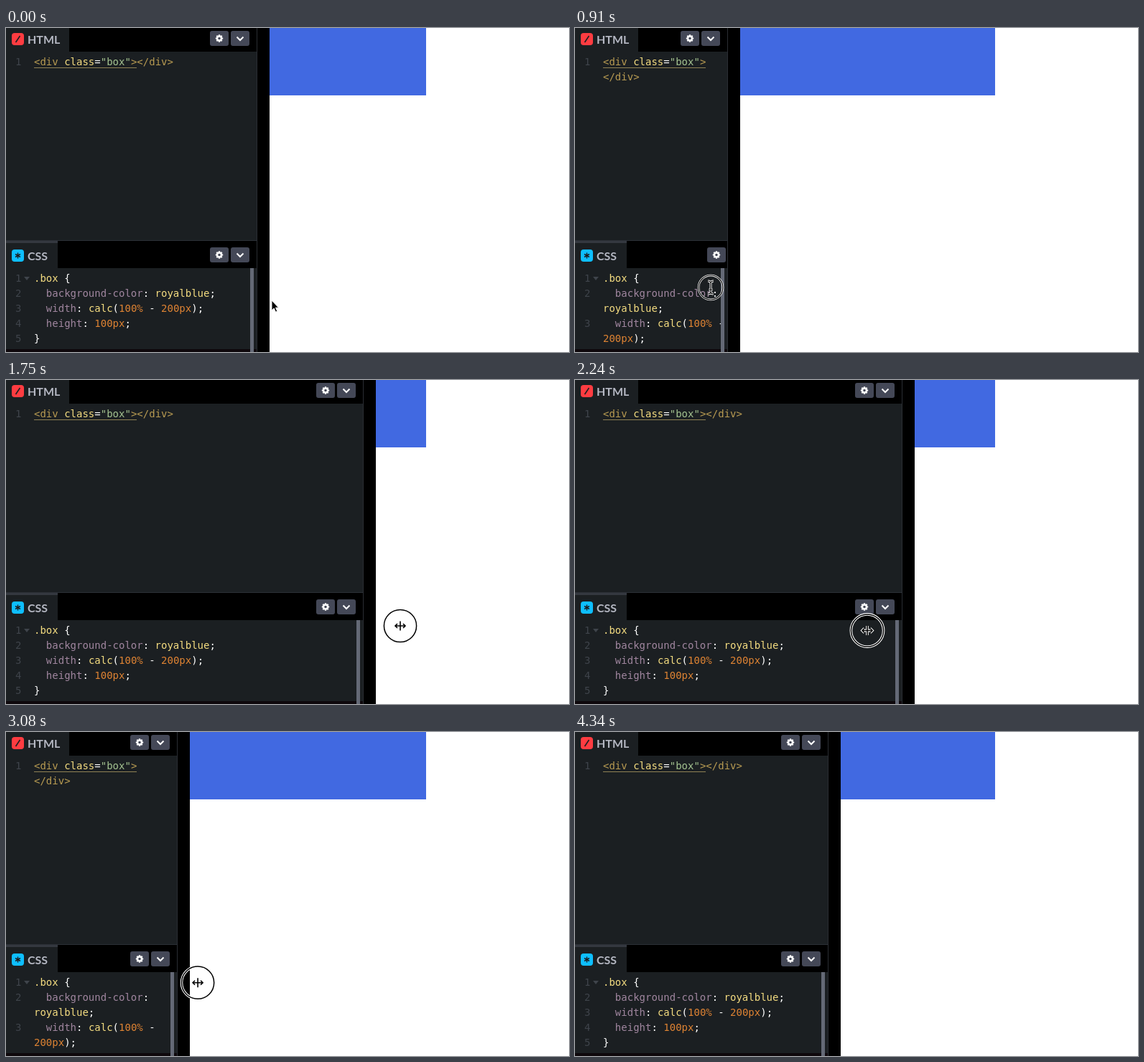
These frames come from a looping animation (784x452 px, 4830 ms). An HTML page:

```html
<!DOCTYPE html>
<html lang="en">
<head>
<meta charset="utf-8">
<title>Resizing a calc() box</title>
<style>
  html, body { margin: 0; width: 100%; height: 100%; overflow: hidden; background: #fff; }
  #stage { position: relative; width: 784px; height: 452px; overflow: hidden; background: #fff; --w: 350px; }
  #stage div, #stage svg { position: absolute; box-sizing: border-box; }
  #box { left: calc(var(--w) + 17px); right: 199px; top: 0; height: 94px; background: #4169e1; }
  #gutter { left: 0; top: 0; height: 452px; width: calc(var(--w) + 17px); background: #000; }
  .panel { left: 0; width: var(--w); overflow: hidden; border-right: 1px solid #2a2d33; }
  #html { top: 0; height: 297px; border-bottom: 1px solid #2c3037; --head: 33px; --mid: 15px; }
  #css { top: 297px; height: 155px; --head: 38px; --mid: 20px; }
  .tab { left: 0; top: 0; height: var(--head); background: #1b1f22; }
  #html .tab { width: 88px; }
  #css .tab { width: 72px; border-top: 3px solid #343840; }
  .icon { left: 8px; top: calc(var(--mid) - 8px); }
  .label { left: 30px; top: calc(var(--mid) - 9px); font: bold 16px/20px Lato, sans-serif; color: #b4b7c2; }
  .btn { top: calc(var(--mid) - 11px); width: 26px; height: 21px; border-radius: 3px; background: #444857; }
  .btn svg { left: 0; top: 0; }
  .gear { left: max(94px, calc(var(--lay) - 66px)); }
  .more { left: max(123px, calc(var(--lay) - 37px)); }
  .panel { --lay: calc(var(--w) + var(--slack, 0px)); }
  .code { left: 0; right: 0; top: var(--head); bottom: 0; background: #1b1f22; overflow: hidden; }
  #css .code { bottom: 4px; }
  .lines { top: 4px; left: 39px; width: max(20px, calc(var(--lay) - 68px));
    font: 14px/21px "DejaVu Sans Mono", monospace; color: #fff; white-space: pre-wrap; }
  #stage .line { position: relative; }
  .line::before { content: attr(data-n); position: absolute; left: -26px; top: 0; color: #3f444b; }
  .fold { left: -14px; top: 8px; border: solid transparent; border-width: 5px 4px 0; border-top-color: #3f444b; }
  .bar { right: 4px; width: 5px; top: 38px; bottom: 0; background: #646976; }
  .foot { left: 0; right: 0; bottom: 0; height: 4px; background: #0e080c; }
  .open { box-shadow: 0 1px #8f8154; }
  .t { color: #b89b52; } .a { color: #f4dc80; } .s { color: #a3c290; }
  .p { color: #a0869f; } .n { color: #de8333; }
  #mouse { left: 0; top: 0; overflow: visible; }
</style>
</head>
<body>
<div id="stage">
  <div id="box"></div>
  <div id="gutter"></div>

  <div id="html" class="panel">
    <div class="code"><div class="lines"><div class="line" data-n="1"><span class="open"><span class="t">&lt;div</span> <span class="a">class</span>=<span class="s">"box"</span><span class="t">&gt;</span></span><wbr><span class="t">&lt;/div&gt;</span></div></div></div>
    <div class="tab"></div>
    <svg class="icon" width="17" height="17"><rect width="17" height="17" rx="4" fill="#ff3c41"/><path d="M5.5 13L11.5 4" stroke="#1b1f22" stroke-width="1.6"/></svg>
    <div class="label">HTML</div>
  </div>

  <div id="css" class="panel">
    <div class="code"><div class="lines"><div class="line" data-n="1"><div class="fold"></div><span class="a">.box</span> {</div><div class="line" data-n="2">  <span class="p">background-color</span>: <span class="a">royalblue</span>;</div><div class="line" data-n="3">  <span class="p">width</span>: <span class="a">calc</span>(<span class="n">100%</span> - <span class="n">200px</span>);</div><div class="line" data-n="4">  <span class="p">height</span>: <span class="n">100px</span>;</div><div class="line" data-n="5">}</div></div></div>
    <div class="foot"></div>
    <div class="bar"></div>
    <div class="tab"></div>
    <svg class="icon" width="17" height="17"><rect width="17" height="17" rx="4" fill="#0ebeff"/><path d="M8.5 4.5v8M5 6.5l7 4M12 6.5l-7 4" stroke="#1b1f22" stroke-width="1.5"/></svg>
    <div class="label">CSS</div>
  </div>

  <svg id="mouse" width="784" height="452" fill="none">
    <g id="pointer">
      <g id="ring"><circle r="22.6" stroke="#fff" stroke-width="3.6"/><circle r="22.6" stroke="#000" stroke-width="1.5"/></g>
      <path id="arrow" d="M0 0V14L3.2 11L5.5 16.2L7.8 15.2L5.5 10.2H9.6Z" fill="#000" stroke="#fff" stroke-width="1"/>
      <g id="resize">
        <path d="M-6 0H6M0-6.5V6.5M-4-3L-7 0L-4 3M4-3L7 0L4 3" stroke="#fff" stroke-width="3.6"/>
        <path d="M-6 0H6M0-6.5V6.5M-4-3L-7 0L-4 3M4-3L7 0L4 3" stroke="#000" stroke-width="1.6"/>
      </g>
      <g id="beam">
        <path d="M-4-9Q0-9 0-6V6Q0 9-4 9M4-9Q0-9 0-6V6Q0 9 4 9M-2.5 3H2.5" stroke="#fff" stroke-width="3"/>
        <path d="M-4-9Q0-9 0-6V6Q0 9-4 9M4-9Q0-9 0-6V6Q0 9 4 9M-2.5 3H2.5" stroke="#000" stroke-width="1.2"/>
      </g>
    </g>
  </svg>
</div>
<script>
  const LOOP = 4830, STEP = 70, LAG = 60;
  const $ = id => document.getElementById(id);
  const stage = $('stage');

  // Pointer path: time, x, y
  const path = [
    [0, 370, 380], [209, 370, 380], [280, 368, 380], [630, 368, 380],
    [770, 300, 371], [850, 231, 365], [910, 189, 362], [1090, 145, 355],
    [1400, 318, 348], [1690, 516, 343], [1750, 549, 343], [1860, 568, 343],
    [2060, 540, 347], [2180, 474, 349.5], [2240, 407, 349.5], [2320, 335, 349.5],
    [2460, 276, 349.5], [2520, 263, 349.5], [2600, 257, 349.5], [3010, 257, 349.5],
    [3300, 337, 351.5], [3360, 342, 352], [3510, 371, 352], [3990, 371, 352],
    [4200, 420, 431], [LOOP, 420, 431]
  ];

  const slope = (i, k) => (path[i + 1][k] - path[i][k]) / (path[i + 1][0] - path[i][0]);

  // Harmonic-mean tangents keep the curve from overshooting
  function tangent(i, k) {
    if (i === 0 || i === path.length - 1) return 0;
    const a = slope(i - 1, k), b = slope(i, k);
    return a * b > 0 ? 2 * a * b / (a + b) : 0;
  }

  function at(t, k) {
    let i = 0;
    while (i < path.length - 2 && t >= path[i + 1][0]) i++;
    const h = path[i + 1][0] - path[i][0], u = (t - path[i][0]) / h, v = 1 - u;
    return v * v * (1 + 2 * u) * path[i][k] + u * u * (3 - 2 * u) * path[i + 1][k]
      + h * u * v * (v * tangent(i, k) - u * tangent(i + 1, k));
  }

  const show = (id, on) => { $(id).style.display = on ? '' : 'none'; };

  const gear = '<circle cx="13" cy="10.5" r="3" stroke-width="2.4"/>'
    + [0, 45, 90, 135].map(a =>
      `<path d="M13 5.3v2.4M13 13.3v2.4" stroke-width="2.2" transform="rotate(${a} 13 10.5)"/>`).join('');
  const chevron = '<path d="M8.5 8.5L13 13L17.5 8.5" stroke-width="2"/>';

  function addButton(panel, kind, art) {
    $(panel).insertAdjacentHTML('beforeend',
      `<div class="btn ${kind}"><svg width="26" height="21" fill="none" stroke="#fff">${art}</svg></div>`);
  }
  for (const panel of ['html', 'css']) {
    addButton(panel, 'gear', gear);
    addButton(panel, 'more', chevron);
  }

  function draw(now) {
    const t = Math.floor((now % LOOP) / STEP) * STEP;
    const dragTime = Math.min(Math.max(t - LAG, 280), 3900);
    stage.style.setProperty('--w', Math.round(at(dragTime, 1)) - 18 + 'px');

    const beam = t >= 840 && t <= 980;
    const arrow = t < 280 || t >= 3990;
    $('css').style.setProperty('--slack', beam ? '37px' : '0px');
    $('pointer').setAttribute('transform', `translate(${at(t, 1)} ${at(t, 2)})`);
    $('ring').setAttribute('transform', `scale(${beam ? 0.75 : 1})`);
    show('pointer', t < 4340);
    show('ring', t >= 560 && t < 3990);
    show('arrow', arrow);
    show('beam', beam);
    show('resize', !arrow && !beam);
  }

  let start;
  function tick(now) {
    start ??= now;
    draw(Math.max(0, now - start));
    requestAnimationFrame(tick);
  }
  draw(0);
  requestAnimationFrame(tick);
</script>
</body>
</html>
```
